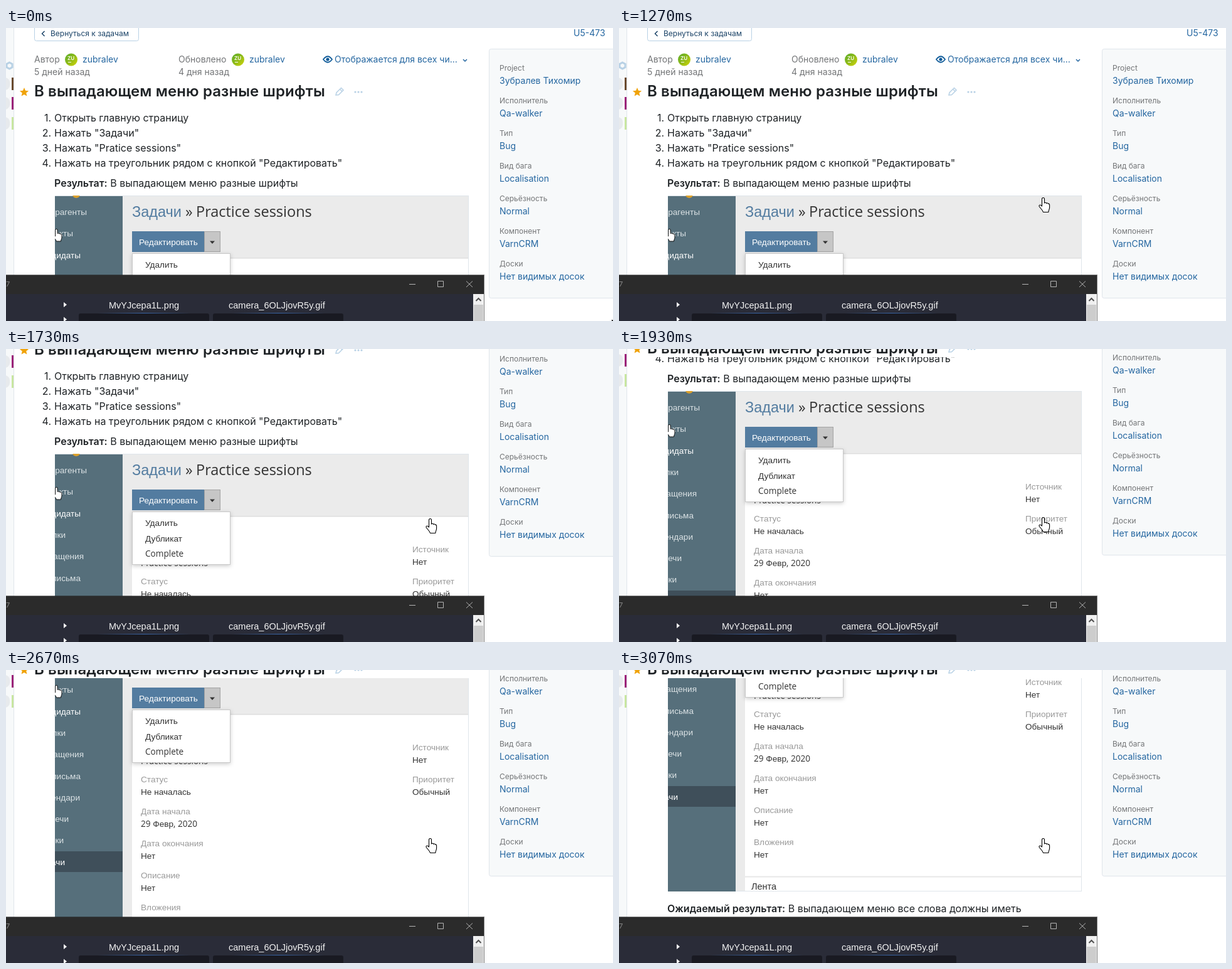
An HTML page that plays this animation: 968x467 px, repeating every 3140 ms.

```html
<!DOCTYPE html>
<html lang="ru">
<head>
<meta charset="utf-8">
<title>Issue page scroll</title>
<style>
  html, body { margin: 0; height: 100%; overflow: hidden; background: #fff; }
  svg { display: block; }
  text { font: 14px Inter, sans-serif; fill: #1f2326; }
  .link { fill: #2466a0; }
  .muted { fill: #737577; }
  .small { font-size: 12px; fill: #737577; }
  .back { font-size: 12px; fill: #1c4468; }
  .body { font-size: 16px; }
  .number { text-anchor: end; }
  .body tspan, .title { font-weight: 600; }
  .title { font-size: 24px; letter-spacing: .1px; }
  .arial, .nav, .label, .onblue { font: 13.6px "Liberation Sans", Arial, sans-serif; fill: #333; }
  .label { fill: #999; }
  .nav { fill: #dbe2e5; text-anchor: end; }
  .lit, .onblue { fill: #fff; }
  .open { font: 13.6px "Open Sans", sans-serif; fill: #333; }
  .feed { font-size: 14.5px; }
  .big { font-size: 23.5px; }
  .blue { fill: #537ca0; }
  .file { font: 14.5px "Liberation Sans", Arial, sans-serif; fill: #f2f2f2; }
  .caption { font-size: 11px; fill: #8a8a8a; }
  .initials { font-size: 8px; font-weight: 600; fill: #fff; }
  .stroke { fill: none; stroke-width: 1.5; }
  .cursor { fill: #fff; stroke: #000; stroke-width: 1.1; stroke-linejoin: round; }
  #menu { filter: drop-shadow(0 2px 3px #0003); }
</style>
</head>
<body>
<svg id="stage" width="968" height="467" viewBox="0 0 968 467"></svg>
<script>
const text = (x, y, value, cls) => `<text x="${x}" y="${y}" class="${cls}">${value}</text>`;
const rect = (x, y, w, h, fill, more = '') =>
  `<rect x="${x}" y="${y}" width="${w}" height="${h}" fill="${fill}" ${more}/>`;
const line = (d, color, width = 1.5) =>
  `<path d="${d}" class="stroke" stroke="${color}" style="stroke-width:${width}"/>`;
const each = (list, draw) => list.map(draw).join('');

const HAND = 'M5.5 14V2.5a2 2 0 0 1 4 0V9c.5-1.2 3-1 3.3.6 .6-1 2.6-.7 2.8.9 .8-.7 2-.2 2 1.2V16' +
  'c0 3-1.5 4-1.8 7.5H7.5C7 20.5 4 18.5 1.2 14.5 .2 12.7 2.2 11.3 3.6 12.4z';
const ARROW = 'M.5.5v16l3.7-3.6 2.5 5.8 2.5-1.1-2.5-5.6h5.2z';

const avatar = x => `<circle cx="${x}" cy="50.5" r="10" fill="url(#lime)"/>` +
  text(x - 6, 51, 'ZU', 'initials') + rect(x - 5, 54, 5, 1, '#fff');

const star = (cx, cy, r) => `<polygon fill="#f0a30a" points="${each([...Array(10).keys()], i => {
  const a = i * Math.PI / 5, q = i % 2 ? r * .45 : r;
  return `${cx + q * Math.sin(a)},${cy - q * Math.cos(a)} `;
})}"/>`;

const page = () =>
  line('M5.5 55l4.5 2.5v5l-4.5 2.5-4.5-2.5v-5z', '#b8d1e5', 3) +
  each([[79, '#6b4a2e'], [110, '#9c1f78'], [142, '#c8e6a0']], ([y, color]) =>
    rect(-10, y, 16, 20, '#e7eaed', 'rx="8"') + rect(9, y, 3, 20, color)) +
  text(905, 13, 'U5-473', 'link') +
  rect(770.5, 33.5, 220, 397, '#f7f9fa', 'rx="3" stroke="#dfe5eb"') +
  each([['Project', 'Зубралев Тихомир'], ['Исполнитель', 'Qa-walker'], ['Тип', 'Bug'],
    ['Вид бага', 'Localisation'], ['Серьёзность', 'Normal'], ['Компонент', 'VarnCRM'],
    ['Доски', 'Нет видимых досок']], ([name, value], i) =>
    text(787, 68 + i * 52, name, 'small') + text(787, 89 + i * 52, value, 'link'));

const header = () =>
  rect(13, -10, 756, 125, '#fff') +
  rect(45.5, -8.5, 166, 29, '#fff', 'rx="3" stroke="#b8d1e5"') +
  line('M61.5 5l-4 4 4 4', '#1c4468') + text(71, 13, 'Вернуться к задачам', 'back') +
  text(45, 55, 'Автор', 'muted') + avatar(104) + text(122, 55, 'zubralev', 'link') +
  text(45, 75, '5 дней назад', 'muted') +
  text(275, 55, 'Обновлено', 'muted') + avatar(370) + text(388, 55, 'zubralev', 'link') +
  text(275, 75, '4 дня назад', 'muted') +
  line('M506 50q7-9.5 14 0-7 9.5-14 0z', '#0f5b99', 1.8) +
  '<circle cx="513" cy="50" r="2.6" fill="#0f5b99"/>' +
  text(524, 55, 'Отображается для всех чи…', 'link') +
  line('M729 50l3 3 3-3', '#2466a0') +
  star(29, 102.5, 7.5) + text(45, 109, 'В выпадающем меню разные шрифты', 'title') +
  line('M526 107l1-4 7.5-7.5 3.5 3.5-7.5 7.5zM532.5 97.5l3.5 3.5', '#b8d1e5') +
  each([557, 562, 567], x => `<circle cx="${x}" cy="102" r="1.6" fill="#b8d1e5"/>`);

const nav = ['Контрагенты 129', 'Контакты 107', 'Кандидаты 119', 'Сделки 95', 'Обращения 124',
  'Эл.&#160;письма 119', 'Календари 118', 'Встречи 100', 'Звонки 92', 'Задачи 94'];

const fields = [[648, 424, 'Источник', 'Нет'], [648, 475, 'Приоритет', 'Обычный'],
  [215, 475, 'Статус', 'Не началась'],
  [215, 526, 'Дата начала', '<tspan class="open">29</tspan> Февр<tspan class="open">, 2020</tspan>'],
  [215, 577, 'Дата окончания', 'Нет'], [215, 628, 'Описание', 'Нет'], [215, 679, 'Вложения', 'Нет']];

const screenshot = () =>
  '<svg x="78" y="267" width="660" height="486" viewBox="78 267 660 486">' +
  rect(78, 267, 660, 486, '#ebebeb') + rect(201, 367, 537, 386, '#fff') +
  rect(201, 366, 537, 1.5, '#dedede') +
  rect(77.5, 267.5, 660, 485, 'none', 'stroke="#dfe5eb"') +
  rect(78, 268, 108, 485, '#566f7b') + rect(78, 585, 108, 33, '#3f4f5a') +
  '<circle cx="112" cy="265" r="6" fill="#dba02c"/>' +
  each(nav, (item, i) => {
    const [name, right] = item.split(' ');
    return text(right, 298 + i * 34.3, name, i === 2 || i === 9 ? 'nav lit' : 'nav');
  }) +
  `<path class="cursor" d="${HAND}" transform="translate(74 320) scale(.85)"/>` +
  text(201, 301, 'Задачи', 'arial big blue') +
  text(286, 301, '»', 'open big') + text(303, 301, 'Practice sessions', 'open big') +
  each(fields, ([x, y, name, value]) => text(x, y, name, 'label') + text(x, y + 20, value, 'arial')) +
  text(215, 445.5, 'Practice sessions', 'open') +
  rect(201, 728.5, 537, 2, '#e8e8e8') +
  text(211, 750, 'Лента', 'arial feed') +
  rect(201, 324, 115, 33, '#537ca0') + text(212, 346, 'Редактировать', 'onblue') +
  rect(316.5, 324.5, 25, 32, '#c6c6c6', 'stroke="#a3a3a3"') +
  '<path d="M325 339.5h8l-4 4.5z" fill="#333"/>' +
  '<g id="menu">' + rect(201.5, 359.5, 156, 84, '#fff', 'stroke="#c8c8c8"') + '</g>' +
  text(222, 382, 'Удалить', 'arial') + text(222, 407, 'Дубликат', 'arial') +
  text(222, 431, 'Complete', 'open') + '</svg>';

const content = () =>
  each(['Открыть главную страницу', 'Нажать "Задачи"', 'Нажать "Pratice sessions"',
    'Нажать на треугольник рядом с кнопкой "Редактировать"'], (step, i) =>
    text(72, 149 + i * 24, i + 1 + '.', 'body number') + text(77, 149 + i * 24, step, 'body')) +
  text(77, 253, '<tspan>Результат:</tspan> В выпадающем меню разные шрифты', 'body') +
  screenshot() +
  text(77, 786, '<tspan>Ожидаемый результат:</tspan> В выпадающем меню все слова должны иметь', 'body');

const fileWindow = () =>
  rect(-5, 393, 768, 90, '#222', 'fill-opacity=".6"') + rect(-5, 394, 767, 30, '#2b2b2b') +
  rect(-5, 424, 750, 50, '#2a2c38') +
  text(-3, 412, '.7', 'caption') +
  line('M643 408.5h10M688.5 403.5h9v9h-9zM734 403.5l10 9.5M744 403.5l-10 9.5', '#b4b4b4', 1) +
  rect(745, 424, 17, 50, '#f0f0f0') + rect(746, 441, 15, 30, '#cdcdcd') +
  line('M749.5 435l4-4 4 4', '#505050', 2) +
  each([441, 464.5], y => `<path d="M92 ${y - 4}l5 4-5 4z" fill="#fff"/>`) +
  text(164, 447, 'MvYJcepa1L.png', 'file') + text(355, 447, 'camera_6OLJjovR5y.gif', 'file') +
  each([116, 330], x => rect(x, 455, 208, 20, '#191a22', 'rx="3"') +
    rect(x + 30, 454, 148, 1, 'url(#glow)'));

const stage = document.getElementById('stage');
stage.innerHTML = `<defs>
  <linearGradient id="lime" x1="0" y1="0" x2="1" y2="1">
    <stop stop-color="#58ab2c"/><stop offset=".5" stop-color="#8fbb18"/><stop offset="1" stop-color="#d3d608"/>
  </linearGradient>
  <linearGradient id="glow">
    <stop stop-color="#3a66a8" stop-opacity="0"/><stop offset=".5" stop-color="#3a66a8"/>
    <stop offset="1" stop-color="#3a66a8" stop-opacity="0"/>
  </linearGradient></defs>` +
  rect(0, 0, 12, 467, '#f7f9fa') + rect(12, 0, 1, 467, '#dfe5eb') +
  `<g id="content">${content()}</g><g id="page">${header()}${page()}</g>
  ${fileWindow()}<path id="cursor" class="cursor"/>`;

const [contentEl, pageEl, cursorEl] = ['content', 'page', 'cursor'].map(id => document.getElementById(id));
const LOOP = 3140, TICK = 200 / 3, STICKY = 102;
const WHEEL = [1443, 1748, 2505, 2840];

const ease = p => (p = Math.min(1, Math.max(0, p)), p * p * (3 - 2 * p));
const move = (el, x, y) => el.setAttribute('transform', `translate(${x} ${y})`);

function render(now) {
  // The picture changes 15 times per second.
  const tick = Math.floor((now % LOOP) / TICK + .06), time = tick * TICK;

  const scroll = Math.round(WHEEL.reduce((sum, start) => sum + 100 * ease((time - start) / 185), 0));
  move(contentEl, 0, -scroll);
  move(pageEl, 0, -Math.min(scroll, STICKY));

  const fly = ease((tick - 3) / 8), settle = ease((tick - 11) / 8);
  const x = 966 - 282 * fly - 15 * settle;
  const y = 465 - 179 * fly - 16 * settle - (tick >= 27 ? 2 : 0);
  cursorEl.setAttribute('d', x > 738 ? ARROW : HAND);
  move(cursorEl, x, y);
  requestAnimationFrame(() => render(performance.now()));
}
render(performance.now());
</script>
</body>
</html>
```
